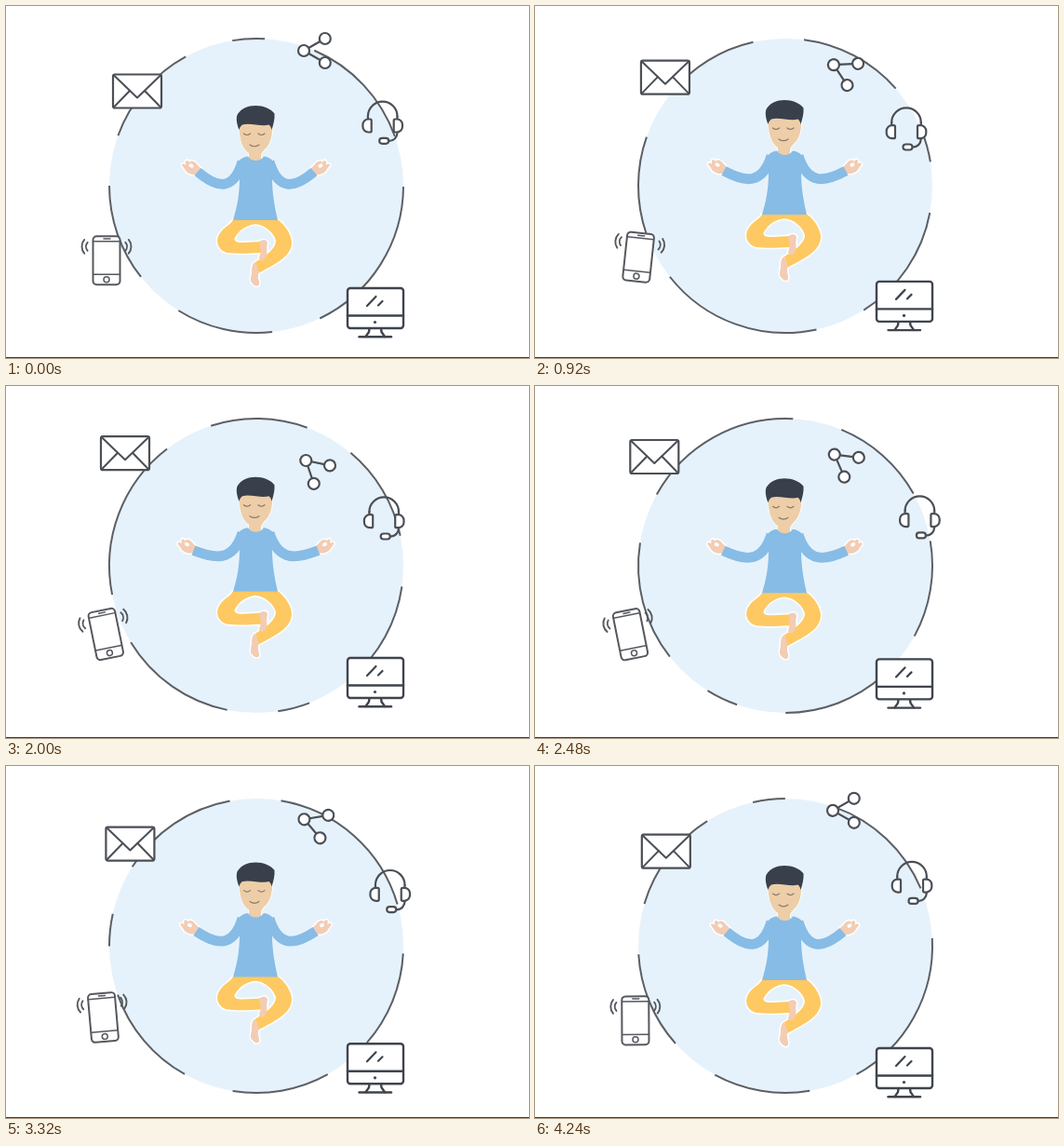
Write an HTML page with a canvas that moves like this. It is 562x378 px and loops after 4280 ms.

```html
<!DOCTYPE html>
<html lang="en">
<head>
<meta charset="utf-8">
<title>Calm amid messages</title>
<style>
html, body { margin: 0; width: 100%; height: 100%; overflow: hidden; background: #fff; }
canvas { display: block; }
</style>
</head>
<body>
<canvas id="stage" width="562" height="378"></canvas>
<script>
const ctx = document.getElementById('stage').getContext('2d');
const LOOP = 4280, STEP = 40, TAU = Math.PI * 2, DEG = Math.PI / 180;
const INK = '#4b4f56', SKIN = '#edcea8', PINK = '#f3ccb4';
const SHIRT = '#86bce6', PANTS = '#fec962', HAIR = '#393f4b';

// Smooth periodic curve through the given points
function track(times, values) {
  const n = times.length;
  const at = i => times[(i + n) % n] + LOOP * Math.floor(i / n);
  const val = i => values[(i + n) % n];
  const rate = i => (val(i + 1) - val(i)) / (at(i + 1) - at(i));
  const slope = i => {
    const a = at(i) - at(i - 1), b = at(i + 1) - at(i);
    return (rate(i - 1) * b + rate(i) * a) / (a + b);
  };
  return t => {
    let i = n - 1;
    while (times[i] > t) i--;
    const h = at(i + 1) - at(i), u = (t - at(i)) / h, v = 1 - u;
    return val(i) * (1 + 2 * u) * v * v + slope(i) * h * u * v * v
      + val(i + 1) * u * u * (3 - 2 * u) - slope(i + 1) * h * u * u * v;
  };
}

const beats = [0, 520, 1360, 2000, 2960, 3640];
const phoneBeats = [0, 520, 1000, 1360, 2000, 2300, 2960, 3640];
const headBeats = [0, 520, 900, 1360, 2000, 2240, 2640, 2960, 3640];
const move = {
  manY: track(beats, [0, -3.4, -8.4, -9.3, -5.2, -1.9]),
  screenY: track(beats, [0, -4.2, -9.6, -11, -7, -2.7]),
  mailX: track(beats, [115, 115, 111, 102, 105.5, 109.5]),
  mailY: track(beats, [73.5, 64, 55, 54.2, 63, 67.8]),
  shareX: track(beats, [320, 320, 322, 322.3, 321, 320]),
  shareY: track(beats, [48, 56, 71, 80, 63, 53]),
  shareTurn: track(beats, [0, 14, 38, 41.5, 28, 12.5]),
  phoneX: track(phoneBeats, [108, 109.5, 111.3, 111, 107.3, 103.5, 103, 106]),
  phoneY: track(phoneBeats, [273.3, 271, 269.5, 268.5, 266.5, 266.5, 268, 271.7]),
  phoneTurn: track(phoneBeats, [0, 5, 6, 4, -11.5, -12, -7.5, -3]),
  headX: track(headBeats, [404.7, 400.2, 399, 400.2, 406.2, 410.3, 414.7, 415, 409.8]),
  headY: track(headBeats, [102.5, 105.5, 109, 114.2, 119.2, 119.3, 117, 115, 108.6])
};

const shape = {
  shirt: 'M260 161.5 C264 167.500 273 167.500 277 161.5 C281 162 285 163.500 287 167 L286 185 C286 202 289 217 292 230 L244 230 C248 217 251 203 251 185 L250 167 C252 163.500 256 162 260 161.5Z',
  rightLeg: 'M262 229.5 L292 229.5 C300 235 307 246 307 254 C307 268 292 276 271 287 L268 275 C280 268 290 260 290 252 C288 244 279 235 267 234 L262 235Z',
  leftLeg: 'M244 229.5 L275 229.5 L271 234 C259 234 250 241 245.5 249.5 C245 254 251 254 255 254 L274 253 L274 265 C258 266 247 266 238 265 C228 263 224 252 230 244 C234 237 241 236 244 229.5Z',
  restingFoot: 'M272 253 C277 250 281 251 281 255 C279 261 282 265 279 270 C277 275 272 274 272 270 L274 264Z',
  standingFoot: 'M268 275 L272 286 C269 290 273 296 272 299 C271 302 267 301 265 298 C261 295 264 290 264 285 C264 280 265 276 268 275Z',
  face: 'M250 121 L286 121 C287 133 286 145 280 152 C277 155 275 157 274 160 L274 167 L261 167 L261 158 C254 153 250 143 250 121Z',
  hair: 'M250.5 133 C247.5 126 247 119 249 116 C253 110 260 107 268 107 C277 107 284 110 288.5 115.5 C289 121 287.5 127 285.5 133 C285 131 284.5 129 282.5 127.5 C275 130 262 125 254 127.5 C252 129 251 131 250.5 133Z',
  features: 'M255.5 137 Q259 140 262.5 137 M271 137 Q274.5 140 278 137 M262 149 Q267 152.5 272 149',
  hand: 'M1 3 L-6 3 C-10 2 -13 0 -14 -3 L-17 -7 C-17 -9 -14 -9 -13 -7 L-13 -11 C-12 -13 -10 -12 -9 -10 C-7 -13 -3 -11 -1 -8 L4 -3Z'
};
for (const key in shape) shape[key] = new Path2D(shape[key]);

function pen(color, width) {
  ctx.strokeStyle = color;
  ctx.lineWidth = width;
}

function fill(path, color, halo) {
  if (halo) {
    pen('#fff', halo);
    ctx.stroke(path);
  }
  ctx.fillStyle = color;
  ctx.fill(path);
}

function group(x, y, turn, draw) {
  ctx.save();
  ctx.translate(x, y);
  ctx.rotate(turn * DEG);
  draw();
  ctx.restore();
}

function line(...p) {
  ctx.beginPath();
  ctx.moveTo(p[0], p[1]);
  for (let i = 2; i < p.length; i += 2) ctx.lineTo(p[i], p[i + 1]);
  ctx.stroke();
}

function box(x, y, w, h, r) {
  ctx.beginPath();
  ctx.roundRect(x, y, w, h, r);
  ctx.fillStyle = '#fff';
  ctx.fill();
  ctx.stroke();
}

function ring(x, y, r) {
  ctx.beginPath();
  ctx.arc(x, y, r, 0, TAU);
  ctx.fillStyle = '#fff';
  ctx.fill();
  ctx.stroke();
}

function arc(x, y, r, from, to) {
  ctx.beginPath();
  ctx.arc(x, y, r, from * DEG, to * DEG);
  ctx.stroke();
}

function disc(t) {
  ctx.fillStyle = '#e6f2fb';
  ctx.beginPath();
  ctx.arc(269, 193, 158, 0, TAU);
  ctx.fill();
  const turn = t / LOOP * 360;
  const dashes = [[0.4, 64.4], [83.8, 122], [141.7, 180], [199.9, 241.3], [260.6, 273.3], [293.2, 340.4]];
  pen('#5c5f64', 2);
  for (const [a, b] of dashes) arc(269, 193, 158, a + turn, b + turn);
}

function arm(k) {
  const x = 206 - 4.5 * k, y = 178 - 1.5 * k;
  group(x, y, 0, () => {
    fill(shape.hand, PINK, 3);
    ctx.fillStyle = '#fff';
    ctx.beginPath();
    ctx.ellipse(-7, -6.5, 2.6, 2, 0.4, 0, TAU);
    ctx.fill();
  });
  ctx.lineCap = 'butt';
  pen(SHIRT, 10.8);
  ctx.beginPath();
  ctx.moveTo(x, y);
  ctx.bezierCurveTo(226 - 2 * k, 195 - 9.5 * k, 244, 200 - 10.5 * k, 254, 167 - 9.3 * k);
  ctx.stroke();
  ctx.lineCap = 'round';
}

function man(t) {
  const y = move.manY(t), k = -y / 9.3;
  arm(k);
  ctx.save();
  ctx.translate(537, 0);
  ctx.scale(-1, 1);
  arm(k);
  ctx.restore();
  group(0, y, 0, () => {
    for (const key of ['rightLeg', 'leftLeg', 'standingFoot', 'restingFoot']) {
      pen('#fff', 3);
      ctx.stroke(shape[key]);
    }
    fill(shape.rightLeg, PANTS);
    fill(shape.leftLeg, PANTS);
    fill(shape.standingFoot, PINK);
    fill(shape.restingFoot, PINK);
    fill(shape.face, SKIN, 1.5);
    fill(shape.shirt, SHIRT);
    fill(shape.hair, HAIR);
    pen('#8c7b6b', 1.2);
    ctx.stroke(shape.features);
  });
}

function mail() {
  pen(INK, 2.2);
  box(0, 0, 52, 36, 2);
  pen(INK, 2);
  line(1, 1, 26, 25, 51, 1);
  line(1, 35, 18, 17.5);
  line(51, 35, 34, 17.5);
}

function share() {
  pen(INK, 2.2);
  line(0, 0, 22.8, -13);
  line(0, 0, 22.8, 13);
  ring(0, 0, 6);
  ring(22.8, -13, 6);
  ring(22.8, 13, 6);
}

function phone() {
  pen('#55585e', 2);
  box(-14.5, -26, 29, 52, 4);
  pen('#55585e', 1.5);
  line(-14, -20.5, 14, -20.5);
  line(-14, 15, 14, 15);
  line(-3, -23.3, 4, -23.3);
  ring(0, 20.5, 3);
  pen('#55585e', 1.9);
  for (const r of [7, 11.5]) {
    arc(15, -15, r, -40, 40);
    arc(-15, -15, r, 140, 220);
  }
}

function headset() {
  pen(INK, 2.2);
  arc(0, 16, 15.8, 180, 360);
  line(-15.8, 16, -15.8, 19);
  line(15.8, 16, 15.8, 19);
  ctx.beginPath();
  ctx.moveTo(16, 33);
  ctx.quadraticCurveTo(15, 42, 7, 42.5);
  ctx.stroke();
  box(-21.3, 19, 9.3, 14, [6, 1.5, 1.5, 6]);
  box(12, 19, 9.3, 14, [1.5, 6, 6, 1.5]);
  box(-3.5, 39.3, 10, 6, 3);
}

function screen() {
  pen('#3f444e', 2.4);
  line(390.5, 346, 390, 350, 386.5, 355);
  line(403, 346, 403.5, 350, 407, 355);
  line(379.5, 355.2, 414, 355.2);
  box(367, 303, 60, 43, 3);
  line(367, 332.5, 427, 332.5);
  pen('#3f444e', 2.2);
  line(388, 322, 397.5, 312);
  line(400, 321.5, 404.5, 317);
  ctx.fillStyle = '#3f444e';
  ctx.beginPath();
  ctx.arc(396.5, 339.5, 1.6, 0, TAU);
  ctx.fill();
}

function draw(t) {
  ctx.fillStyle = '#fff';
  ctx.fillRect(0, 0, 562, 378);
  ctx.lineJoin = 'round';
  ctx.lineCap = 'butt';
  disc(t);
  ctx.lineCap = 'round';
  man(t);
  group(move.mailX(t), move.mailY(t), 0, mail);
  group(move.shareX(t), move.shareY(t), move.shareTurn(t), share);
  group(move.phoneX(t), move.phoneY(t), move.phoneTurn(t), phone);
  group(move.headX(t), move.headY(t), 0, headset);
  group(0, move.screenY(t), 0, screen);
  ctx.fillStyle = '#3c3c3c';
  ctx.fillRect(0, 377, 562, 1);
}

const start = performance.now();
function tick() {
  const t = (performance.now() - start) % LOOP;
  draw(Math.floor(t / STEP) * STEP);
  requestAnimationFrame(tick);
}
tick();
</script>
</body>
</html>
```
